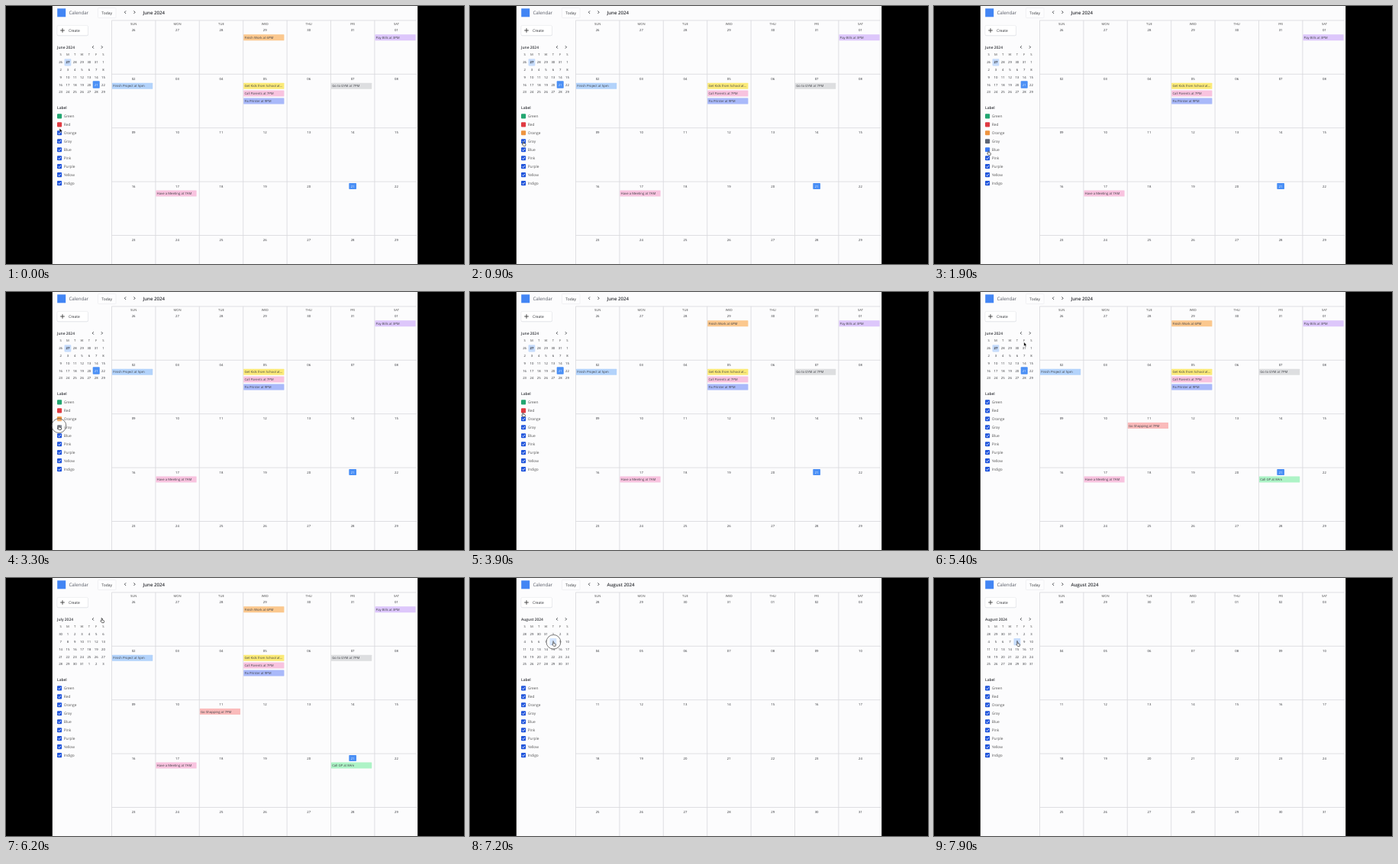
Write an HTML page that moves like this. It is 600 by 338 pixels and loops after 8000 ms.

```html
<!DOCTYPE html>
<html lang="en">
<head>
<meta charset="utf-8">
<title>Calendar</title>
<style>
html, body { margin: 0; width: 100%; height: 100%; overflow: hidden; background: #000; }
svg { display: block; width: 100vw; height: 100vh; }
text { font-family: "Open Sans", "Noto Sans", sans-serif; text-rendering: geometricPrecision; }
</style>
</head>
<body>
<svg id="stage" viewBox="0 0 600 338"></svg>
<script>
const LOOP = 8000;
const DAY = 864e5;
const INK = '#2f3136', BLUE = '#4a8ff5', PALE = '#c6dcfc', RULE = '#d8d9dc', CHECK = '#2156dc';
const svg = document.getElementById('stage');

function el(parent, tag, attrs, content) {
  const n = document.createElementNS('http://www.w3.org/2000/svg', tag);
  for (const k in attrs) n.setAttribute(k, attrs[k]);
  if (content !== undefined) n.textContent = content;
  parent.appendChild(n);
  return n;
}
const group = parent => el(parent, 'g', {});
const box = (p, x, y, w, h, fill, rx = 0, more = {}) =>
  el(p, 'rect', { x, y, width: w, height: h, fill, rx, ...more });
const line = (p, d, stroke, w) =>
  el(p, 'path', { d, stroke, 'stroke-width': w, fill: 'none' });
// y is the optical middle of the capitals
const label = (p, s, x, y, size, fill, anchor = 'start', weight = 400) =>
  el(p, 'text', { x, y: y + size * 0.36, 'font-size': size, fill,
    'text-anchor': anchor, 'font-weight': weight }, s);
const show = (n, on) => n.setAttribute('visibility', on ? 'visible' : 'hidden');

const LEFT = 138.5, COL = 57.4, ROW = 70.4, TOP = 18.9;
const colX = c => LEFT + c * COL;
const midX = c => colX(c) + 28.6;
const dateY = r => r ? TOP + r * ROW + 5.9 : 31.8;
const miniX = c => 71.6 + c * 9.32;
const miniY = r => 73.9 + r * 9.75;
const labelY = i => 144.4 + i * 10.96;

// the 35 days of a month view, starting on a Sunday
function monthDays(m) {
  const first = Date.UTC(2024, m, 1);
  const start = first - new Date(first).getUTCDay() * DAY;
  return Array.from({ length: 35 }, (_, i) => new Date(start + i * DAY).getUTCDate());
}

box(svg, 60.8, 0, 478.4, 338, '#fcfcfd');

// top bar
box(svg, 67.2, 3.3, 11, 11, '#4285f4');
label(svg, 'Calendar', 82.4, 9, 6.15, '#575b66');
box(svg, 120.4, 2.4, 23.7, 13.2, '#fdfdfe', 1.4, { stroke: '#e4e5e9', 'stroke-width': 0.5 });
label(svg, 'Today', 132.1, 9, 4.95, INK, 'middle');
const chevron = (x, y, dir, s) =>
  line(svg, `M${x - dir * s / 2} ${y - s}l${dir * s} ${s}l${-dir * s} ${s}`, INK, 0.85);
chevron(156.2, 8.2, -1, 1.8);
chevron(168.3, 8.2, 1, 1.8);

// sidebar
box(svg, 66.9, 26.1, 41, 13.2, '#d9dbe0', 1.8, { opacity: 0.7 });
box(svg, 66.9, 25.4, 40.6, 13.2, '#fff', 1.8, { stroke: '#e0e2e6', 'stroke-width': 0.5 });
line(svg, 'M71.2 32h5.6M74 29.2v5.6', '#444', 0.95);
label(svg, 'Create', 81.9, 32, 4.9, INK);
chevron(114, 53.9, -1, 1.7);
chevron(125.7, 53.9, 1, 1.7);
[...'SMTWTFS'].forEach((s, c) => label(svg, s, miniX(c), 63.6, 4.2, '#444', 'middle'));
label(svg, 'Label', 67, 133.4, 4.9, INK, 'start', 600);

function miniMonth(m, name) {
  const g = group(svg), june = m === 5;
  label(g, name + ' 2024', 67, 53.8, 4.9, INK, 'start', 600);
  if (june) {
    box(g, miniX(1) - 4.4, 69.2, 8.8, 9.2, PALE, 0.8);
    box(g, miniX(5) - 4.5, miniY(3) - 4.8, 9, 9.4, BLUE, 0.8);
  }
  const picked = m === 7 ? box(g, miniX(4) - 4.4, miniY(1) - 4.7, 8.8, 9.2, PALE, 0.8) : null;
  monthDays(m).forEach((d, i) =>
    label(g, d, miniX(i % 7), miniY(i / 7 | 0), 4.25,
      june && i === 26 ? '#e6efff' : INK, 'middle', june && i === 1 ? 700 : 400));
  return { g, picked };
}
const minis = [miniMonth(5, 'June'), miniMonth(6, 'July'), miniMonth(7, 'August')];

// main grid
for (let r = 0; r < 5; r++) line(svg, `M${LEFT} ${TOP + r * ROW}H539.2`, RULE, 0.8);
for (let c = 0; c < 7; c++) line(svg, `M${colX(c)} ${TOP}V338`, RULE, 0.8);
['SUN', 'MON', 'TUE', 'WED', 'THU', 'FRI', 'SAT'].forEach((s, c) =>
  label(svg, s, midX(c), 23.1, 4.15, '#444', 'middle'));

function mainMonth(m, name) {
  const g = group(svg);
  label(g, name + ' 2024', 179.4, 9.1, 6.12, INK, 'start', 600);
  if (m === 5) box(g, midX(5) - 4.8, dateY(3) - 4, 9.7, 8, BLUE, 0.7);
  monthDays(m).forEach((d, i) => {
    const c = i % 7, r = i / 7 | 0;
    label(g, String(d).padStart(2, '0'), midX(c), dateY(r), 4.25,
      m === 5 && i === 26 ? '#e6efff' : INK, 'middle');
  });
  return g;
}
const mains = [mainMonth(5, 'June'), mainMonth(7, 'August')];

// label name, unchecked colour, event colour, events as [text, column, row, slot]
const labels = [
  ['Green', '#22a670', '#adf3c6', [['Call GP at 8Am', 5, 3, 0]]],
  ['Red', '#e03a42', '#fabbbb', [['Go Shopping at 7PM', 2, 2, 0]]],
  ['Orange', '#ee9440', '#fbc88e', [['Finish Work at 6PM', 3, 0, 0]]],
  ['Gray', '#5c6474', '#dddee0', [['Go to GYM at 7PM', 5, 1, 0]]],
  ['Blue', '#3a78f2', '#b3d3fb', [['Finish Project at 5pm', 0, 1, 0]]],
  ['Pink', '#e255a0', '#f8c3df', [['Call Parents at 7PM', 3, 1, 1], ['Have a Meeting at 7AM', 1, 3, 0]]],
  ['Purple', '#a05ae8', '#ddc7fb', [['Pay Bills at 3PM', 6, 0, 0]]],
  ['Yellow', '#e6b420', '#fbea78', [['Get Kids from School at...', 3, 1, 0]]],
  ['Indigo', '#6064ea', '#a9b9fa', [['Fix Printer at 9PM', 3, 1, 2]]]
].map(([name, off, tint, events], i) => {
  const y = labelY(i), ev = group(svg);
  events.forEach(([s, c, r, k]) => {
    const ey = dateY(r) + 9.5 + k * 9.85;
    box(ev, colX(c) + 0.5, ey - 4, 53.2, 8, tint, 0.5);
    label(ev, s, colX(c) + 1.7, ey, 4.25, '#3d3f45');
  });
  const sq = box(svg, 67, y - 3.05, 6.1, 6.1, CHECK, 1);
  const tick = line(svg, `M68.4 ${y + 0.1}l1.2 1.3l2.3 -2.6`, '#fff', 0.85);
  label(svg, name, 75.7, y, 4.85, '#555');
  return { off, ev, sq, tick };
});

// pointer
const ring = el(svg, 'circle', { fill: '#fff', 'fill-opacity': 0.25, stroke: '#444', 'stroke-width': 0.7 });
const hand = el(svg, 'path', {
  d: 'M0 0q.6 0 .6 .6v1.4l1.8 .4q.7 .2 .6 .9l-.4 2.1h-2.6l-1.7-2.1q-.1-.6 .6-.5l.5 .4v-2.6q0-.6 .6-.6z',
  fill: '#fff', stroke: '#222', 'stroke-width': 0.65, 'stroke-linejoin': 'round'
});
const arrow = el(svg, 'path', {
  d: 'M0 0v5l1.2-1l.8 1.8l.9-.4l-.8-1.7h1.5z',
  fill: '#000', stroke: '#fff', 'stroke-width': 0.3
});

// when each label is pressed: off, then on again
const TOGGLE = [[-1, 4550], [-1, 4130], [430, 3730], [1160, 3350], [1680, 2820]];
const NEXT1 = 5900, NEXT2 = 6400, PICK = 7200;
const clicks = [430, 1160, 1680, 2820, 3350, 3730, 4130, 4550, NEXT1, NEXT2, PICK];

// time, x, y of the fingertip
const path = [
  [0, 70.2, 160.2], [250, 69.8, 165], [560, 69.8, 165], [900, 70, 178], [1260, 70, 177],
  [1520, 71.2, 189.5], [1900, 71.4, 190], [2870, 70, 187], [3120, 69.4, 175.2],
  [3400, 69.4, 175.2], [3600, 69.5, 165], [3770, 69.5, 165], [3980, 69.4, 155],
  [4170, 69.4, 155], [4380, 69.6, 144.2], [4750, 69.6, 144.2], [5600, 125.6, 53.2],
  [6650, 125.6, 53.2], [7050, 109.4, 83.8], [8000, 109.6, 84]
];

function pointAt(t) {
  let i = 0;
  while (i < path.length - 2 && path[i + 1][0] <= t) i++;
  const [t0, x0, y0] = path[i], [t1, x1, y1] = path[i + 1];
  const u = Math.min(1, (t - t0) / (t1 - t0)), e = u * u * (3 - 2 * u);
  return [x0 + (x1 - x0) * e, y0 + (y1 - y0) * e];
}

function overButton(x, y) {
  const onBox = x < 73.5 && labels.some((_, i) => Math.abs(y - labelY(i)) < 3.2);
  const onDay = x < 132 && y > 69 && y < 118;
  const onNext = Math.abs(x - 125.7) < 4 && Math.abs(y - 53.9) < 4;
  return onBox || onDay || onNext;
}

function render(t) {
  const month = t < NEXT1 ? 0 : t < NEXT2 ? 1 : 2;
  minis.forEach((m, i) => show(m.g, i === month));
  const moved = t >= PICK;
  show(minis[2].picked, moved);
  show(mains[0], !moved);
  show(mains[1], moved);

  labels.forEach((l, i) => {
    const [off, on] = TOGGLE[i] || [LOOP, LOOP];
    const checked = t < off || t >= on;
    l.sq.setAttribute('fill', checked ? CHECK : l.off);
    show(l.tick, checked);
    show(l.ev, checked && !moved);
  });

  const [x, y] = pointAt(t), over = overButton(x, y);
  for (const p of [hand, arrow]) p.setAttribute('transform', `translate(${x} ${y})`);
  show(hand, over);
  show(arrow, !over);
  const press = clicks.find(c => t >= c - 120 && t < c + 100);
  show(ring, press !== undefined);
  if (press !== undefined) {
    const u = (t - press + 120) / 220;
    ring.setAttribute('cx', x);
    ring.setAttribute('cy', y);
    ring.setAttribute('r', 9.4 * Math.min(1, 0.6 + u * 2));
    ring.setAttribute('opacity', Math.min(1, (1 - u) * 3));
  }
}

const begin = performance.now();
function tick() {
  render((performance.now() - begin) % LOOP);
  requestAnimationFrame(tick);
}
tick();
</script>
</body>
</html>
```
